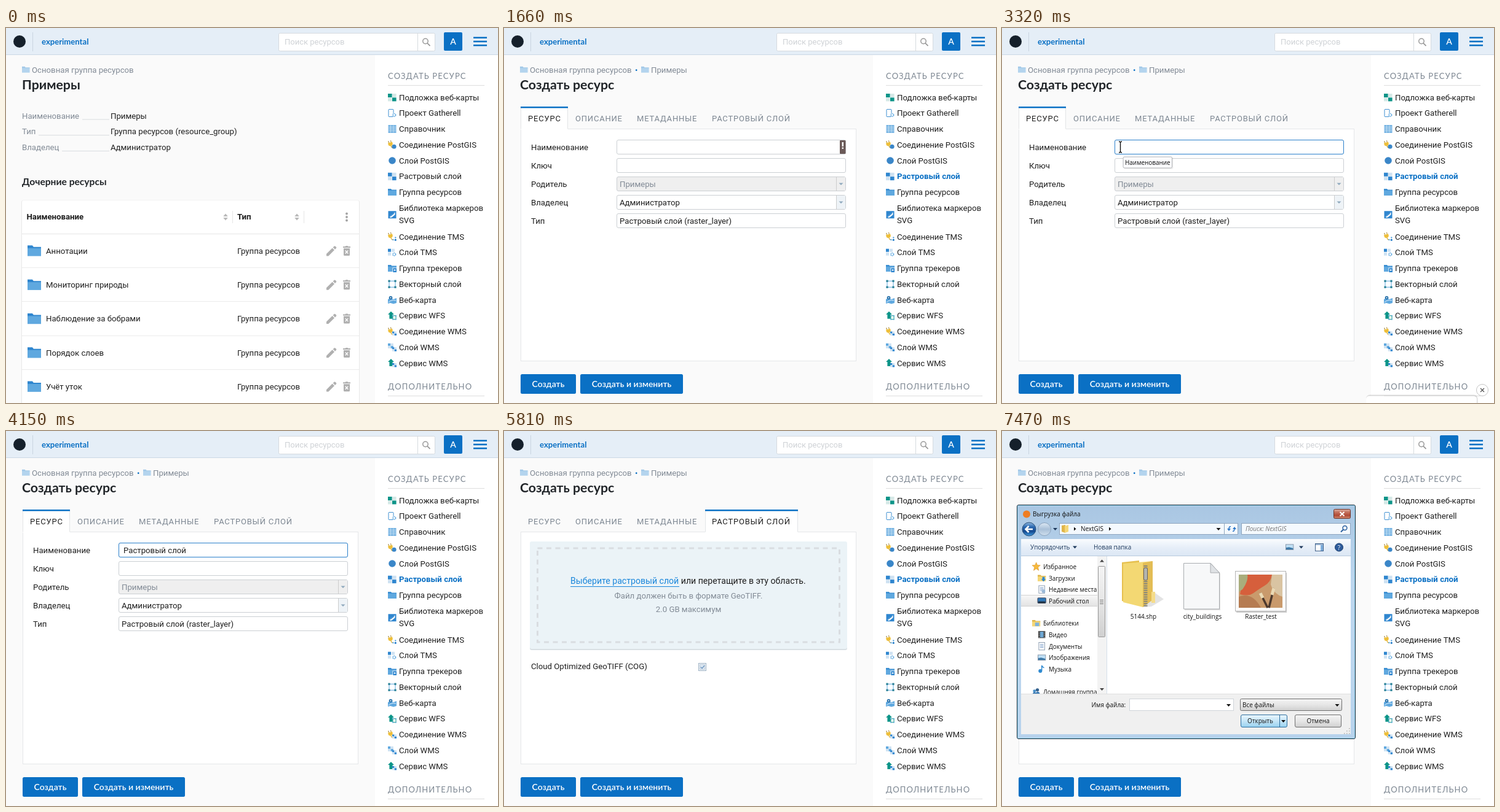
These frames come from a looping animation (800x611 px, 8 s). An HTML page:

```html
<!DOCTYPE html>
<html lang="ru">
<head>
<meta charset="utf-8">
<title>Создать ресурс</title>
<style>
html, body { margin: 0; width: 100%; height: 100%; overflow: hidden; background: #fafafa; }
svg { display: block; width: 100vw; height: 100vh; }
text { font: 13.2px Roboto, sans-serif; fill: #1f1f1f; white-space: pre; }
.grey { fill: #828b96; }
.blue { fill: #0a70c4; }
.b { font-weight: 700; }
.h1 { font: 700 21.3px Lato, sans-serif; fill: #212529; }
.h2 { font: 700 15.6px Lato, sans-serif; fill: #212529; }
.site { font: 700 13.1px Lato, sans-serif; fill: #0a70c4; }
.cap { font: 13px Lato, sans-serif; letter-spacing: 1.15px; fill: #7d8792; }
.tab { font-size: 13px; letter-spacing: .8px; fill: #7d8792; }
.on { fill: #222; }
.btn { font: 600 14px Lato, sans-serif; fill: #fff; text-anchor: middle; }
.ph { font-size: 13px; fill: #cfd2d6; }
.big { font-size: 14.1px; }
.mid { text-anchor: middle; }
.w { font: 9.95px "Open Sans", "Noto Sans", sans-serif; fill: #111; }
.tool { fill: #1e395b; }
.it { font-style: italic; fill: #777; }

/* Visibility windows of an 8 s storyboard with 830 ms beats */
.k { animation: 8s step-end infinite; }
.list { animation-name: list; }
.idle { animation-name: idle; }
.hover { animation-name: hover; }
.create { animation-name: create; }
.general { animation-name: general; }
.warn { animation-name: warn; }
.beam { animation-name: beam; }
.focus { animation-name: focus; }
.tip { animation-name: tip; }
.typed { animation-name: typed; }
.hand { animation-name: hand; }
.upload { animation-name: upload; }
.pick { animation-name: pick; }
.dialog { animation-name: dialog; }
@keyframes list { 0% { visibility: visible } 20.75%, to { visibility: hidden } }
@keyframes idle { 0% { visibility: visible } 10.375%, to { visibility: hidden } }
@keyframes hover { 0%, 20.75%, to { visibility: hidden } 10.375% { visibility: visible } }
@keyframes create { 0% { visibility: hidden } 20.75%, to { visibility: visible } }
@keyframes general { 0%, 72.625%, to { visibility: hidden } 20.75% { visibility: visible } }
@keyframes warn { 0%, 41.5%, to { visibility: hidden } 20.75% { visibility: visible } }
@keyframes beam { 0%, 51.875%, to { visibility: hidden } 31.125% { visibility: visible } }
@keyframes focus { 0%, 72.625%, to { visibility: hidden } 41.5% { visibility: visible } }
@keyframes tip { 0%, 51.875%, to { visibility: hidden } 41.5% { visibility: visible } }
@keyframes typed { 0%, 72.625%, to { visibility: hidden } 51.875% { visibility: visible } }
@keyframes hand { 0%, 72.625%, to { visibility: hidden } 62.25% { visibility: visible } }
@keyframes upload { 0% { visibility: hidden } 72.625%, to { visibility: visible } }
@keyframes pick { 0%, 93.375%, to { visibility: hidden } 83% { visibility: visible } }
@keyframes dialog { 0% { visibility: hidden } 93.375%, to { visibility: visible } }
</style>
</head>
<body>
<svg id="stage" viewBox="0 0 800 611" preserveAspectRatio="none"></svg>
<script>
const text = (x, y, s, cls = '') => `<text x="${x}" y="${y}" class="${cls}">${s}</text>`;
const rect = (x, y, w, h, fill, more = '') => `<rect x="${x}" y="${y}" width="${w}" height="${h}" fill="${fill}" ${more}/>`;
const box = (x, y, w, h, fill, stroke, r = 0) => rect(x, y, w, h, fill, `stroke="${stroke}" rx="${r}"`);
const circle = (x, y, r, fill, more = '') => `<circle cx="${x}" cy="${y}" r="${r}" fill="${fill}" ${more}/>`;
const fill = (d, c, more = '') => `<path d="${d}" fill="${c}" ${more}/>`;
const line = (d, c = '#ddd', w = 1, more = '') => `<path d="${d}" fill="none" stroke="${c}" stroke-width="${w}" ${more}/>`;
const at = (x, y, s, k = 1) => `<g transform="translate(${x} ${y}) scale(${k})">${s}</g>`;
const show = (cls, ...parts) => `<g class="k ${cls}">${parts.join('')}</g>`;
const fade = (id, ...stops) => `<linearGradient id="${id}" x2="0" y2="1">` +
  stops.map((c, i) => `<stop offset="${i / (stops.length - 1)}" stop-color="${c}"/>`).join('') + '</linearGradient>';

const BLUE = '#0a70c4', SKY = '#5fa8df', PALE = '#cfe2f2', TEAL = '#0d9488';

/* Icons on a 14 px square */
const folder = (c = SKY, top = '#3c8fd2') =>
  fill('M0 1.5h5l1.3 1.6H14V5H0z', top) + fill('M0 4.3h14v8.2H0z', c);
const checker = (a, b) => rect(0, 1, 6.6, 6, a) + rect(7, 1, 6.6, 6, b) + rect(0, 7.4, 6.6, 6, b) + rect(7, 7.4, 6.6, 6, a);
const plug = line('M1.5 3.5L.7 1M5 2.5L4.5 0', '#a88a3c', 1.2) + fill('M0 4.2l7-2 .8 3.4q-.5 3.2-3.3 3.4T.8 7.5z', '#eebf3a') + line('M5 8.5q.4 3.4 3.4 3.4', '#d9a820', 1.2);
const dots = circle(8.5, 12, 1.2, SKY) + circle(12.3, 8.5, 1.2, SKY) + circle(12.3, 12.3, 1.5, BLUE);
const tiles = at(7, 6.5, checker('#2f86cf', PALE), .52);
const nodes = line('M8 7h5v6H8z', TEAL, 1) + [[8, 7], [13, 7], [8, 13], [13, 13]].map(p => circle(...p, 1, SKY)).join('');
const arrow = fill('M5 0l5 5H7.6v7H2.4V5H0z', TEAL);
const cogDot = circle(10.3, 10, 3.2, '#fff') + circle(10.3, 10, 2.3, 'none', `stroke="${SKY}" stroke-width="1.6" stroke-dasharray="1.6 .7"`);
const icons = {
  base: checker(TEAL, '#d6e9e7'),
  phone: box(1, .8, 8, 12, '#fff', '#3d8fd1', 1) + cogDot,
  book: rect(.5, .5, 13, 13, '#79b5e3') + line('M4.5 1v12M9 1v12M1 4h12M1 7h12M1 10h12', '#d4e8f7', .7),
  pgLink: plug + circle(10, 10, 3.6, '#3a86c8'),
  pg: circle(7, 7, 5.8, '#3a86c8'),
  raster: checker('#2f86cf', PALE),
  folder: folder(),
  marker: rect(.5, 1, 13, 12, '#2f86cf') + fill('M11.5 3v4L6 11.5H3l1-3z', '#fff') + line('M4 9.5l6-5', '#2f86cf', 1.2),
  tmsLink: plug + dots,
  tms: rect(0, 1, 5, 5, '#2f86cf') + rect(6, 1, 5, 5, PALE) + rect(0, 7, 5, 5, PALE) + cogDot,
  track: folder() + rect(7.5, 6, 6.5, 7.5, '#fff') + rect(8.3, 6.8, 5.7, 6.7, '#2f86cf') + circle(11.2, 10, 1.3, '#fff'),
  vector: line('M2 2h10v10H2z', SKY, 1) + [[2, 2], [12, 2], [2, 12], [12, 12]].map(([x, y]) => rect(x - 1.6, y - 1.6, 3.2, 3.2, '#2b8296')).join(''),
  map: fill('M0 6l4-2 5 2 5-2v8l-5 1.5-5-1.5-4 1z', SKY) + line('M1 11q5-5 12-3', '#e4f1fb', 1) + circle(4.5, 3.5, 2.8, '#256fa8') + circle(4.5, 3.5, 1, '#fff'),
  wfs: arrow + nodes,
  wmsLink: plug + tiles,
  wms: at(0, 0, checker(SKY, PALE), .65) + tiles,
  wmsServe: arrow + tiles
};

/* Cursors with the tip at 0,0 */
const handCursor = fill('M-1.5 1.2q0-2 1.5-2t1.5 2l.6 5q1.2-1 2.2.3 1.5-.8 2.2.7 2-.5 2.2 1.5 0 4-1.2 6.5v2.3H-.6v-2q-3-3-5-6.5 1-2 3 .2l1.9 1.6z', '#fff', 'stroke="#333" stroke-width="1"') +
  line('M1 6v4M3.6 7.5v3M6 8.5v2.5', '#555', .8);
const beamCursor = line('M-2.5 0Q0 0 0 2V16Q0 18 2.5 18M2.5 0Q0 0 0 2M0 16Q0 18-2.5 18', '#111', 1.4);
const arrowCursor = fill('M0 0v15l3.6-3.2 2.4 5.6 2.6-1.1-2.4-5.4h4.9z', '#fff', 'stroke="#222" stroke-width="1"');

const tooltip = (x, y, w, s) => rect(x + 1, y + 1, w + 1, 19, '#0001', 'rx="3"') + box(x, y, w, 18, '#fbfbfd', '#b4b6ba', 2) + text(x + 3, y + 12.8, s, 'w');

const menu = [
  ['base', 'Подложка веб-карты'], ['phone', 'Проект Gatherell'], ['book', 'Справочник'],
  ['pgLink', 'Соединение PostGIS'], ['pg', 'Слой PostGIS'], ['raster', 'Растровый слой'],
  ['folder', 'Группа ресурсов'], ['marker', 'Библиотека маркеров'], ['tmsLink', 'Соединение TMS'],
  ['tms', 'Слой TMS'], ['track', 'Группа трекеров'], ['vector', 'Векторный слой'],
  ['map', 'Веб-карта'], ['wfs', 'Сервис WFS'], ['wmsLink', 'Соединение WMS'],
  ['wms', 'Слой WMS'], ['wmsServe', 'Сервис WMS']
];

function menuRow([icon, label], i) {
  const y = 113 + 25.75 * i + (i > 7 ? 21 : 0);
  const pic = at(621, y - 7 + (icon === 'marker' ? 11 : 0), icons[icon]);
  if (icon === 'marker') return pic + text(639, y + 5, label) + text(639, y + 25, 'SVG');
  if (icon !== 'raster') return pic + text(639, y + 4.7, label);
  return pic + show('idle', text(639, y + 4.7, label)) +
    show('hover', rect(600, 229, 2.5, 26, BLUE), text(639, y + 4.7, label, 'blue')) +
    show('create', text(639, y + 4.7, label, 'blue b'));
}

const header = () => [
  rect(0, 0, 800, 43, '#e5eef7'), rect(0, 43, 800, 1, '#cbd8e5'),
  circle(22, 22, 10, '#15202b'),
  line('M43.5 7v31', '#c9d5e2'), text(58, 26.5, 'experimental', 'site'),
  box(443.5, 8.5, 254, 29, '#fff', '#d5dadf', 2), line('M669.5 9v28', '#d5dadf'),
  text(453, 27, 'Поиск ресурсов', 'ph'),
  circle(682, 21.5, 4.2, 'none', 'stroke="#999" stroke-width="1.5"'), line('M685 24.7l4.5 4.5', '#999', 1.8),
  rect(712, 7, 30, 30, BLUE, 'rx="2"'), text(727, 26.8, 'A', 'btn b'),
  line('M760 15.7h22M760 22h22M760 28.3h22', BLUE, 2.5)
].join('');

const sidebar = () => rect(600, 44, 200, 567, '#fff') +
  text(621, 82.5, 'СОЗДАТЬ РЕСУРС', 'cap') + line('M621 93.5h157') +
  menu.map(menuRow).join('') +
  text(621, 588.5, 'ДОПОЛНИТЕЛЬНО', 'cap') + line('M621 599.5h157');

const crumb = (x, s) => at(x, 61.5, folder('#b3d4ee', '#a3c9e8'), .9) + text(x + 16, 72.6, s, 'grey');

const sorter = x => fill(`M${x} 302.5l3.8 4.4h-7.6zM${x} 313.5l3.8-4.4h-7.6z`, '#b9b9b9');

function tableRow(name, i) {
  const y = 363 + 55.3 * i;
  return at(35, y - 11, folder(SKY, '#2f86cf'), 1.57) + text(65, y + 4.8, name) + text(376, y + 4.8, 'Группа ресурсов') +
    at(521, y - 8, fill('M0 13v3.4h3.4L13 6.8 9.6 3.4zM10.6 2.4L14 5.8l2-2q.7-1 0-1.7L14.4.5q-.8-.7-1.7 0z', '#b0b0b0')) +
    at(548, y - 8, fill('M0 1h3.5l1-1h3l1 1H12v2H0zM1 4h10v10.5q0 1.5-1.5 1.5h-7Q1 16 1 14.5z', '#b0b0b0') + line('M3.7 7.5l4.6 5M8.3 7.5l-4.6 5', '#fff', 1.4)) +
    line(`M26 ${Math.round(y + 27) + .5}h548`, '#ececec');
}

const info = [['Наименование', 'Примеры', 124], ['Тип', 'Группа ресурсов (resource_group)', 53], ['Владелец', 'Администратор', 91]];

const listPage = () => show('list',
  text(26, 99.5, 'Примеры', 'h1'),
  info.map(([k, v, x], i) => text(26, 147.5 + 25.7 * i, k, 'grey') + text(170, 147.5 + 25.7 * i, v) +
    line(`M${x} ${149 + 25.7 * i}H168`, '#d9dcdf', 1)).join(''),
  text(26, 256, 'Дочерние ресурсы', 'h2'),
  rect(25, 281, 550, 335, '#0000000b', 'rx="3"'), rect(25.5, 280.5, 549, 335, '#0000000f', 'rx="2"'), rect(26, 281, 548, 335, '#fff', 'rx="2"'),
  text(33.5, 312, 'Наименование', 'b'), text(376, 312, 'Тип', 'b'), sorter(357), sorter(473),
  line('M368.5 298v20M484.5 298v20M26 335.5h548', '#e6e6e6'),
  [302.5, 308, 313.5].map(y => circle(554, y, 1.9, '#a3a3a3')).join(''),
  ['Аннотации', 'Мониторинг природы', 'Наблюдение за бобрами', 'Порядок слоев', 'Учёт уток'].map(tableRow).join(''));

const tabs = [['РЕСУРС', 39], ['ОПИСАНИЕ', 116], ['МЕТАДАННЫЕ', 216], ['РАСТРОВЫЙ СЛОЙ', 338]];
const activeTab = (x, w, i) => rect(x, 128, w, 37.5, '#fff') + line(`M${x + .5} 130v34.5M${x + w - .5} 130v34.5`, '#e3e5e7') +
  rect(x, 128, w, 2.5, BLUE) + text(tabs[i][1], 152.3, tabs[i][0], 'tab on');

const dropdown = (y, c) => rect(540, y + .5, 15, 22, c) + line(`M540.5 ${y}v23`, '#ccc') + fill(`M544.5 ${y + 10}h7l-3.5 3.6z`, '#8fa9bd');

const generalTab = () => show('general', activeTab(27, 77, 0),
  ['Наименование', 'Ключ', 'Родитель', 'Владелец', 'Тип'].map((s, i) => {
    const y = 182.5 + 30 * i;
    return text(44, y + 16, s) + box(183.5, y, 372, 23, i === 2 ? '#efefef' : '#fff', '#cbcfd3', 2.5);
  }).join(''),
  dropdown(242.5, '#efefef'), dropdown(272.5, '#eef3f7'),
  text(188, 258.5, 'Примеры', 'grey'), text(188, 288.5, 'Администратор'), text(188, 318.5, 'Растровый слой (raster_layer)'),
  show('warn', rect(546, 183, 9.5, 22, '#6b5a58', 'rx="1"'), rect(549.6, 186, 2.4, 7, '#fff'), rect(549.6, 194.5, 2.4, 2.4, '#fff')),
  show('focus', box(183.5, 182.5, 372, 23, '#fff', '#2b80cb', 2.5)),
  show('typed', text(191, 198.5, 'Растровый слой')),
  show('beam', at(192.5, 185, beamCursor)),
  show('tip', tooltip(197, 210, 79.5, 'Наименование')),
  show('hand', text(338, 152.3, 'РАСТРОВЫЙ СЛОЙ', 'tab on'), at(401, 157, handCursor)));

const uploadTab = () => show('upload', activeTab(327, 151, 3),
  rect(42, 181, 516, 176, '#d9e0e4', 'rx="3"'), rect(42, 180, 516, 175, '#ebf3f7', 'rx="3"'),
  rect(54.5, 191, 491, 153, 'none', 'stroke="#d9dde1" stroke-width="3" stroke-dasharray="8 6.5"'),
  `<text x="108" y="249.3" class="big"><tspan fill="#1b87db">Выберите растровый слой</tspan> или перетащите в эту область.</text>`,
  line('M108 253.5h177', '#1b87db'),
  text(300, 272.5, 'Файл должен быть в формате GeoTIFF.', 'grey mid'), text(300, 294.5, '2.0 GB максимум', 'grey mid'),
  text(44, 388, 'Cloud Optimized GeoTIFF (COG)'),
  box(316.5, 378.5, 12, 12, '#f3f6f9', '#9fb3c5'), box(318.5, 380.5, 8, 8, '#dde8f2', '#bccbda'), line('M319.8 384.5l2.2 2.3 3.8-4.6', '#6f97c0', 1.4),
  show('pick', tooltip(228.5, 266.5, 87, 'Файл не выбран.'), at(251, 247.5, arrowCursor)));

const createPage = () => show('create',
  text(213, 72.6, '•', 'blue'), crumb(223, 'Примеры'), text(26, 99.5, 'Создать ресурс', 'h1'),
  box(27.5, 164.5, 545, 378, '#fff', '#e5e7e9'),
  tabs.map(([s, x]) => text(x, 152.3, s, 'tab')).join(''),
  generalTab(), uploadTab(),
  rect(27, 564, 90, 32, BLUE, 'rx="2.5"'), text(72, 584.5, 'Создать', 'btn'),
  rect(124, 564, 167, 32, BLUE, 'rx="2.5"'), text(207.5, 584.5, 'Создать и изменить', 'btn'));

const popup = () => show('tip',
  rect(592, 597, 182, 20, '#0000000c', 'rx="7"'), rect(592, 598, 181, 20, '#0000001c', 'rx="6"'), rect(592, 599.5, 180, 20, '#fff', 'rx="5"'),
  circle(781, 590, 9.5, '#fff', 'stroke="#c4c4c4"'), line('M778 587l6 6M784 587l-6 6', '#555', 1.3));

/* File chooser */
const star = fill('M7 0l2 4.8 5 .3-3.9 3.3L11.4 14 7 11l-4.4 3 1.3-5.6L0 5.1l5-.3z', '#f6b93b', 'stroke="#d8902a" stroke-width=".6"');
const sheet = box(2, .5, 10, 13, '#fff', '#8b9bb0') + line('M4 4h6M4 6.5h6M4 9h6', '#6d94c4', 1);
const yellow = folder('#f5d777', '#e0b64a');
const screen = box(0, 2, 14, 9, '#2f78b8', '#445', 1) + rect(1, 8, 12, 3, '#234');
const picture = box(.5, 2.5, 13, 9, '#bfe0f6', '#8796a8') + fill('M1 11V8l5-1 7 2v2z', '#3e79a8');
const places = [
  [49, 221, star, 'Избранное'], [58, 240, yellow + fill('M8 5h4v4h2l-4 4-4-4h2z', '#2f86cf'), 'Загрузки'],
  [58, 258.5, sheet + circle(10, 10, 3, '#9ab9d8'), 'Недавние места'], [58, 277, screen, 'Рабочий стол'],
  [49, 313.5, yellow + rect(5, 6, 7, 6, '#7fb2dc'), 'Библиотеки'],
  [58, 332, rect(1, 1, 12, 12, '#333') + rect(4, 2, 6, 10, '#6fa8d4') + line('M2.5 2v11M11.5 2v11', '#ddd', 1, 'stroke-dasharray="1.5"'), 'Видео'],
  [58, 351, sheet, 'Документы'], [58, 369.5, picture, 'Изображения'],
  [58, 388, circle(4.5, 10.5, 3.2, '#2f8ad0') + line('M7 10V1q1 3 4 4', '#2f8ad0', 1.6), 'Музыка'],
  [49, 425, circle(9, 4, 2.8, '#35618c') + circle(4, 6, 2.6, '#4a90c8') + fill('M0 13q1-5 4-5t4 5zM6 12q0-5 3.500-5t4 5z', '#3f7cb4'), 'Домашняя группа']
];
const down = (x, y, c = '#111') => fill(`M${x - 3.5} ${y - 2}h7l-3.5 4z`, c);
const side = (x, y) => fill(`M${x} ${y - 3}v6l3.5-3z`, '#111');

const zipFile = at(195, 211, fill('M50 50l18 13-20 12-14 1z', '#0000001c') + fill('M0 3L28 0V70L0 66z', '#e6c04f') + fill('M2 5L50 1V64L34 76 2 68z', '#f3d873') +
  fill('M34 4l16-3v63L34 76z', '#e3bd55') + line('M38.500 8V75', '#84857c', 6, 'stroke-dasharray="2 1.6"') + box(35.5, 12, 6, 20, '#b4b5ae', '#666', 2) + rect(48, 51, 6, 18, '#f5dc8a'));
const blankFile = at(295, 215, fill('M2 2h44l14 15v60H2z', '#0002') + fill('M.5.5H44L58.5 16v59H.5z', '#f7f8f9', 'stroke="#a9acb0"') + fill('M44 .5V16h14.5z', '#dfe2e5', 'stroke="#a9acb0"'));
const paintFile = at(379, 228, rect(2, 3, 82, 65, '#0003') + box(.5, .5, 82, 65, '#fafafa', '#b5b5b5') + rect(6, 6, 71, 54, '#c99a6c') +
  fill('M14 6h46q-2 12-12 18T30 36 8 38z', '#d65f3c') + fill('M6 6h14q2 10-8 24l-6 4z', '#a9ad7c') + fill('M60 6h17v36q-14-4-19-20z', '#d9c4a2') + fill('M6 42q22-8 36 18H6z', '#b67c52') +
  line('M41 36l12 24M63 28l-8 32', '#4d3a2e', 3.5) + line('M41 36l4 8M63 28l-3 11', '#ead9b4', 5));

const dialog = () => show('dialog',
  box(24.5, 120.5, 550, 381, 'url(#frame)', '#1d2d3c', 2.5), box(25.5, 121.5, 548, 379, 'none', '#8fcfe8', 2),
  circle(40, 135.5, 6, '#ee7d23'), text(50, 139.2, 'Выгрузка файла', 'w'),
  box(539.5, 127.5, 27, 15, 'url(#red)', '#6b352b', 2), line('M549.5 132l7 6.5M556.5 132l-7 6.5', '#fff', 2),
  circle(44, 160, 11, 'url(#orb)', 'stroke="#2c4f77"'), line('M50 160H39M43.5 155l-5 5 5 5', '#fff', 2.6),
  circle(69, 160, 10.5, 'url(#dim)', 'stroke="#8ba3bd"'), down(86.5, 160, '#1e395b'),
  box(93.5, 150.5, 268, 18, '#f4f9fe', '#8fa6bf'), at(96, 152, fill('M1 2l6-1v13l-6-2z', '#e0b64a') + fill('M6 3l6-2v11l-6 2z', '#f5d777')),
  side(117, 159.5), text(128, 163.2, 'NextGIS', 'w'), side(174, 159.5), down(352, 160),
  box(361.5, 150.5, 22, 18, '#f4f9fe', '#8fa6bf'),
  line('M372 156q-3-1-3 4M375 163q3 1 3-4', '#2f78c8', 1.5) + fill('M366 159h6l-3 4zM375 160h6l-3-4z', '#2f78c8'),
  box(389.5, 150.5, 177, 18, '#f4f9fe', '#8fa6bf'), text(396, 163.2, 'Поиск: NextGIS', 'w it'),
  circle(557.5, 158, 3.4, 'none', 'stroke="#2b5f9e" stroke-width="1.5"'), line('M555 160.5l-4 4', '#2b5f9e', 2),
  rect(31, 176, 536, 318, '#f0f0f0'), rect(31, 176, 536, 28, 'url(#bar)'), line('M31 203.5h536', '#b9cadd'),
  text(46, 193, 'Упорядочить', 'w tool'), down(118.5, 189.5, '#1e395b'), text(149, 193, 'Новая папка', 'w tool'),
  at(461, 182.5, picture, .95), down(486.5, 189.5, '#1e395b'),
  box(509.5, 183.5, 13, 12, '#fff', '#42628a'), rect(510, 184, 12, 2, '#9fb9d6'), rect(518, 186, 4, 9, '#7eaedc'),
  circle(548, 189.5, 6.5, '#2d5c9c', 'stroke="#1b3c6b"'), `<text x="548" y="193.5" class="w mid b" style="fill:#fff">?</text>`,
  rect(31, 204, 536, 224, '#fff'),
  '<g clip-path="url(#pane)">', rect(31, 267, 126, 19, 'url(#sel)'), line('M31 267.5h126M31 285.5h126', '#d2d2d2'),
  places.map(([x, y, icon, s]) => at(x, y - 7, icon, .95) + text(x + 18, y + 3.8, s, 'w')).join(''), '</g>',
  rect(155, 204, 15, 224, '#f3f3f3'), line('M170.5 204v224', '#d5dfea'),
  box(156.5, 220.5, 11, 115, 'url(#thumb)', '#989898', 1), line('M159 275.5h6M159 278.5h6M159 281.5h6', '#777'),
  fill('M159 213.5h7l-3.5-4z', '#444'), down(162.5, 421, '#444'),
  zipFile, blankFile, paintFile,
  text(230, 306, '5144.shp', 'w mid'), text(326, 306, 'city_buildings', 'w mid'), text(421, 306, 'Raster_test', 'w mid'),
  line('M31 428.5h536', '#dfdfdf'), text(145.5, 450, 'Имя файла:', 'w'),
  box(207.5, 436.5, 169, 19, '#fff', '#d0d5da'), down(368.5, 447),
  box(387.5, 436.5, 165, 19, 'url(#thumb)', '#707070', 2), text(391, 450, 'Все файлы', 'w'), down(545, 447),
  box(388.5, 462.5, 75, 20, 'url(#act)', '#2f6f9f', 2.5), line('M451.5 463v19', '#2f6f9f'), text(420, 476, 'Открыть', 'w mid'), down(457.5, 473),
  box(476.5, 462.5, 75, 20, 'url(#thumb)', '#707070', 2.5), text(514, 476, 'Отмена', 'w mid'),
  [[564, 486], [564, 490], [560, 490], [564, 494], [560, 494], [556, 494]].map(([x, y]) => rect(x, y - 2, 1.6, 1.6, '#b5b5b5')).join(''));

const defs = '<defs>' + fade('frame', '#a9c6e2', '#bcd6ee', '#bcd6ee', '#b7d2ec') + fade('red', '#dcb0a4', '#c4705c', '#b04a36', '#d08a70') +
  fade('orb', '#8fb8e0', '#2a68b0', '#154a90', '#3f9be0') + fade('dim', '#dce8f4', '#a9c0d8', '#cfdfee') + fade('bar', '#fafcfe', '#e6eef8', '#dbe7f4') +
  fade('sel', '#f8f8f8', '#e2e2e2') + fade('thumb', '#f4f4f4', '#e6e6e6', '#d0d0d0') + fade('act', '#eaf6fd', '#c4e5f7', '#98d1ef') +
  '<clipPath id="pane"><rect x="31" y="204" width="124" height="224"/></clipPath></defs>';

document.getElementById('stage').innerHTML = [
  defs, rect(0, 0, 800, 611, '#fafafa'), header(), sidebar(), crumb(26, 'Основная группа ресурсов'),
  listPage(), createPage(), popup(), dialog(), show('hover', at(747, 244.5, handCursor))
].join('');
</script>
</body>
</html>
```
